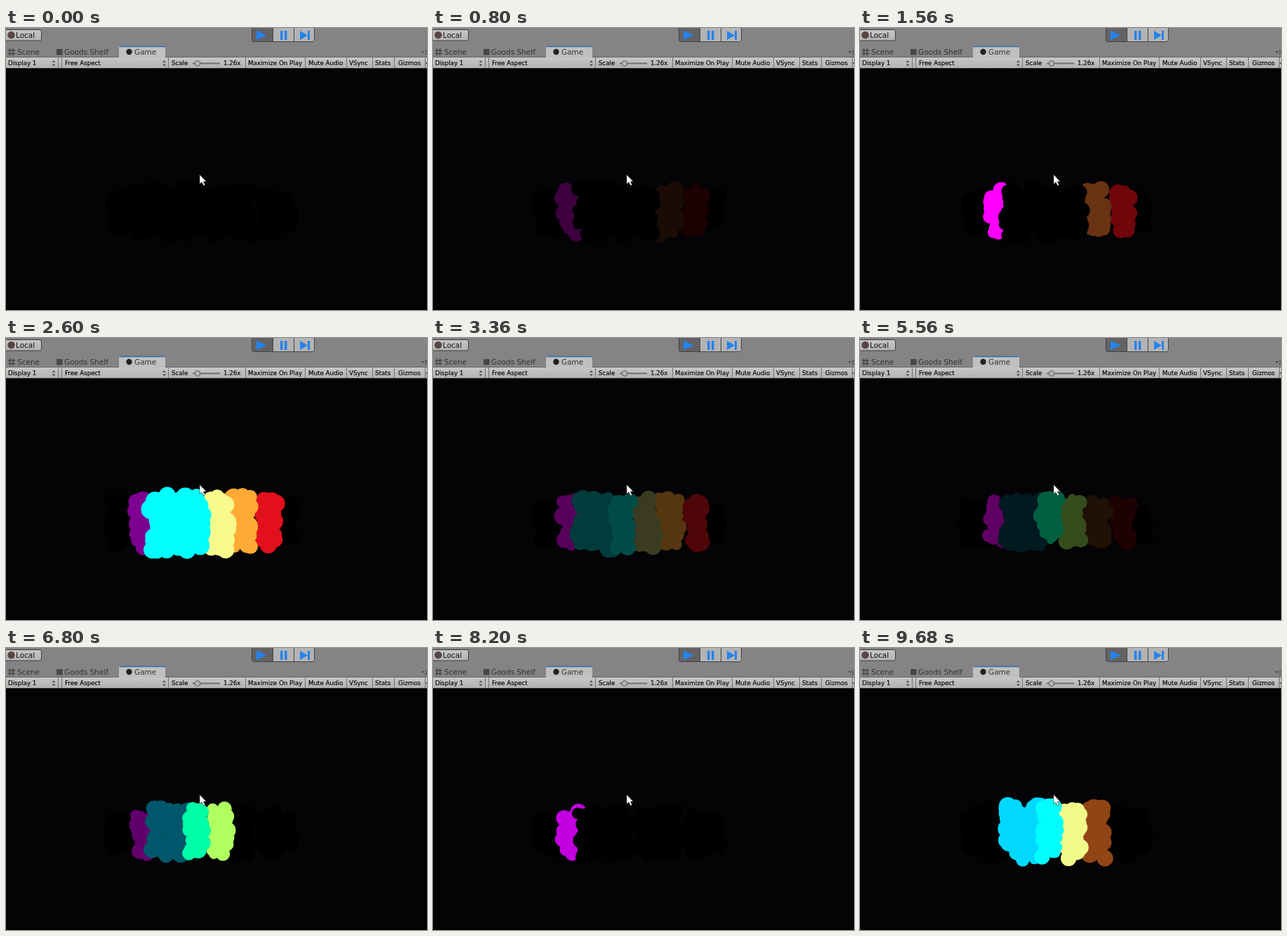
Write an HTML page with a canvas that moves like this. It is 600x402 px and loops after 9720 ms.

```html
<!DOCTYPE html>
<html lang="en">
<head>
<meta charset="utf-8">
<title>Particle bands</title>
<style>
html, body { margin: 0; width: 100%; height: 100%; overflow: hidden; background: #040306; }
canvas, svg { position: absolute; left: 0; top: 0; width: 600px; height: 402px; }
text { font-family: "DejaVu Sans", sans-serif; font-size: 8.7px; fill: #000; stroke: #000; stroke-width: .15px; }
.tab { font-size: 10.5px; fill: #333; stroke: none; }
</style>
</head>
<body>
<canvas id="view" width="600" height="402"></canvas>
<svg viewBox="0 0 600 402">
  <defs>
    <linearGradient id="bar" x2="0" y2="1">
      <stop stop-color="#c8c7c8"/><stop offset="1" stop-color="#b3b2b3"/>
    </linearGradient>
    <g id="updown" fill="#555"><path d="M-2.5 49L0 46L2.5 49zM-2.5 51.5L0 54.5L2.5 51.5z"/></g>
  </defs>
  <rect width="600" height="42" fill="#858385"/>

  <rect x="-3.5" y="2.5" width="54" height="15.5" rx="2.5" fill="url(#bar)" stroke="#3d3c3d"/>
  <circle cx="7.5" cy="10" r="5.3" fill="#594644"/>
  <text class="tab" x="14" y="14" style="fill:#111">Local</text>

  <path d="M350 0h30v19.5h-27q-3 0-3-3z" fill="#646264"/>
  <path d="M380 0h60v16.5q0 3-3 3h-57z" fill="#b4b3b4"/>
  <path d="M350.5 0v16.5q0 3 3 3h83q3 0 3-3V0M380.5 0v19.5M410.5 0v19.5" fill="none" stroke="#444344"/>
  <path d="M357 3.5L371.500 10.5L357 17zM391 4h3.5v13H391zM397 4h3.5v13H397zM419 4L430 10.5L419 17zM430 4h3v13h-3z" fill="#2484ec"/>

  <path d="M3 32h10M3 36.5h10M5.5 29v10.5M10 29v10.5" stroke="#444" stroke-width="1.3"/>
  <text class="tab" x="16" y="38">Scene</text>
  <rect x="72" y="30" width="8.5" height="8.5" fill="#484648"/>
  <text class="tab" x="83" y="38">Goods Shelf</text>
  <path d="M161 42V28q0-2 2-2h62q2 0 2 2v14z" fill="#c1c0c1"/>
  <path d="M162 26.5h65" stroke="#326eae" stroke-width="1.5"/>
  <circle cx="175.5" cy="34" r="4.2" fill="#222"/>
  <text class="tab" x="183" y="38">Game</text>
  <path d="M592 33h4l-2 3zM597 32h3v1h-3zM597 34.5h3v1h-3zM597 37h3v1h-3z" fill="#444"/>

  <rect y="42" width="600" height="15" fill="url(#bar)"/>
  <path d="M0 41.5h161M227 41.5h373" stroke="#666466"/>
  <path d="M0 57.5h600" stroke="#302f30"/>
  <path d="M74.5 42v15M79.5 42v15M231.5 42v15M341.5 42v15M426.5 42v15M485.5 42v15M522.5 42v15M553.5 42v15M597.5 42v15" stroke="#737273"/>
  <text x="3" y="53">Display 1</text>
  <use href="#updown" x="68"/>
  <text x="84" y="53">Free Aspect</text>
  <use href="#updown" x="225.5"/>
  <text x="236" y="53">Scale</text>
  <path d="M266 50.5h39" stroke="#707070" stroke-width="2"/>
  <circle cx="273" cy="50.5" r="3.8" fill="#b8b7b8" stroke="#555"/>
  <text x="310" y="53">1.26x</text>
  <text x="345" y="53">Maximize On Play</text>
  <text x="431" y="53">Mute Audio</text>
  <text x="489" y="53">VSync</text>
  <text x="526" y="53">Stats</text>
  <text x="559" y="53">Gizmos</text>
  <path d="M598 49h3l-1.5 3z" fill="#444"/>

  <rect y="398" width="600" height="4" fill="#000"/>
  <path d="M276 209v13.5l3-2.8 2.5 5 2.2-1-2.3-4.8h4z" fill="#fff" stroke="#222" stroke-width=".6"/>
</svg>
<script>
const LOOP = 9720, STEP = 40, CYCLES = 9, LIFE = LOOP / CYCLES;
const ctx = document.getElementById('view').getContext('2d');

// Moments of the light sequence, cloud size and number of beats up to the next one
const times = [160, 1560, 2600, 4160, 6800, 8200, 9680];
const spread = [0.95, 0.97, 1.12, 0.95, 0.97, 0.93, 1.06];
const beats = [3, 2, 3, 5, 3, 3];

// Painted back to front: x range and height of centres, particle count, colour at each moment
const bands = [
  { x: [150, 180], h: 54, n: 26 },
  { x: [388, 408], h: 46, n: 18 },
  { x: [364, 385], h: 62, n: 24, colors: '000 70060a e1101a 72080c 000 000 000' },
  { x: [323, 350], h: 68, n: 30, colors: '000 693313 ffaa35 75400f 000 000 914515' },
  { x: [291, 316], h: 70, n: 30, colors: '000 000 f8fa8c 000 b0ff60 000 f2fa8a' },
  { x: [184, 209], h: 66, n: 28, colors: '000 ff00ff 7d0091 ff00ff 61006c c200e0 000' },
  { x: [206, 260], h: 74, n: 60, colors: '000 000 00ffff 000 00566a 000 00d8ff' },
  { x: [259, 281], h: 70, n: 28, colors: '000 000 00ffff 064a34 00ffa6 000 00ffff' }
];

const rgb = hex => hex.length === 3 ? [0, 0, 0]
  : [0, 2, 4].map(i => parseInt(hex.slice(i, i + 2), 16));
for (const b of bands) b.keys = b.colors ? b.colors.split(' ').map(rgb) : times.map(() => [0, 0, 0]);

const mix = (a, b, u) => a + (b - a) * u;
const rand = n => {
  const v = Math.sin(n * 127.1 + 31.7) * 43758.5453;
  return v - Math.floor(v);
};

function phase(t) {
  let i = 0;
  while (i < times.length - 2 && t >= times[i + 1]) i++;
  const u = Math.min(1, Math.max(0, (t - times[i]) / (times[i + 1] - times[i])));
  const glow = 0.45 + 0.55 * Math.cos(Math.PI * beats[i] * u) ** 2;
  return { i, u, glow };
}

function drawBand(band, index, t, { i, u, glow }) {
  const color = band.keys[i].map((c, k) => Math.round(mix(c, band.keys[i + 1][k], u) * glow));
  const size = mix(spread[i], spread[i + 1], u);
  const [x0, x1] = band.x;
  ctx.fillStyle = `rgb(${color})`;
  ctx.beginPath();
  for (let p = 0; p < band.n; p++) {
    const age = t / LIFE + rand(p + index * 61);
    const life = age % 1;
    const seed = p * 17 + index * 311 + (Math.floor(age) % CYCLES) * 1009;
    // Low-discrepancy places keep the cloud filled; the jitter keeps it lumpy
    const col = (p * 0.7549 + 0.2 * rand(seed)) % 1;
    const row = (p * 0.5698 + 0.2 * rand(seed + 7)) % 1;
    const drift = (life - 0.5) * 7;
    const x = mix(x0, x1, col) + drift * (rand(seed + 5) - 0.5);
    const y = 263 + ((row - 0.5) * band.h + drift * (rand(seed + 9) - 0.5)) * size;
    const r = (10 + 3 * rand(seed + 3)) * size * Math.sin(Math.PI * life) ** 0.25;
    ctx.moveTo(x + r, y);
    ctx.arc(x, y, r, 0, 7);
  }
  ctx.fill();
}

function draw(now) {
  const t = Math.floor((now % LOOP) / STEP) * STEP;
  const shown = t < 160 ? 0 : t;
  const state = phase(shown);
  ctx.fillStyle = '#040306';
  ctx.fillRect(0, 0, 600, 402);
  bands.forEach((band, index) => drawBand(band, index, shown, state));
}

const start = performance.now();
function tick() {
  draw(performance.now() - start);
  requestAnimationFrame(tick);
}
tick();
</script>
</body>
</html>
```
